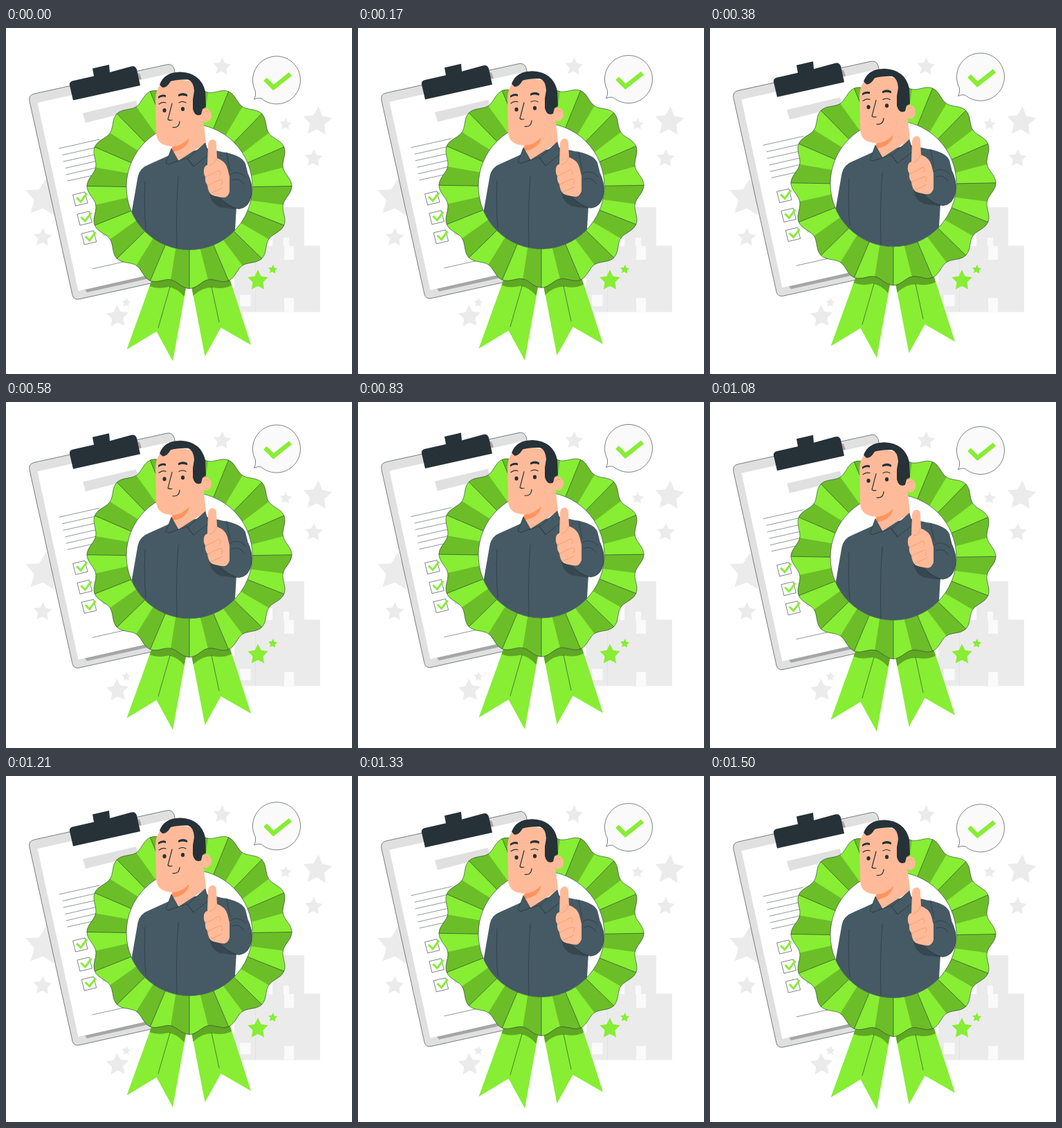
Animation of 500 by 500 pixels, one loop 1.54 s. Source, as an HTML page:

```html
<!DOCTYPE html>
<html lang="en">
<head>
<meta charset="utf-8">
<title>Approved</title>
<style>
html, body { margin: 0; width: 100%; height: 100%; overflow: hidden; background: #fff; }
svg { display: block; width: 100vw; height: 100vh; }
.line { fill: none; stroke: #263238; stroke-width: .6; stroke-linecap: round; stroke-linejoin: round; }
.outlined { stroke: #263238; stroke-width: .6; stroke-linejoin: round; }
.green { fill: #87ee33; }
.deep { fill: #6bbe28; }
.shade { fill: #5fa724; }
.skin { fill: #ffbb99; }
.ink { fill: #263238; }
.shirt { fill: #455a64; }
.tick { fill: none; stroke: #87ee33; }
</style>
</head>
<body>
<svg viewBox="0 0 500 500">
  <defs>
    <clipPath id="frame"><path d="M174 229.500A91 91 0 0 0 356 229.500V60H174Z"/></clipPath>
    <g id="item">
      <path class="line" d="M97 241l17-4l4 16l-17 4Z"/>
      <path class="tick" stroke-width="3" d="M102 245l6 6l9-12"/>
    </g>
  </defs>

  <g fill="#ebebeb">
    <path d="M330 315H385V259H431V314.500H454V410.500H330Z"/>
    <path fill="#fafafa" d="M402 315h14v20h-14zM401 303h8v12h-8zM402 390h14v20.500h-14zM338 385.500h15.500v16.500h-15.500z"/>
    <path fill="none" stroke="#e0e0e0" stroke-width=".8" d="M360.500 315V410"/>
  </g>
  <g id="stars"></g>

  <g id="floating">
    <g id="clipboard">
      <path class="outlined" fill="#e0e0e0" d="M41 95L232 53Q240 51 243 59L306 341Q307 347 300 349L105 392Q98 393 96 386L34 106Q32 97 41 95Z"/>
      <path fill="#a6a6a6" d="M114 378L220 354V359L117 382Z"/>
      <path fill="#fff" d="M45.500 108L235 66L294 337L104.500 380Z"/>
      <path fill="#a6a6a6" d="M188 64l5 2l3 8l-6 1z"/>
      <path class="ink" d="M97 104.500L92 83Q91 78 96 76.500L127 69.500L125 58.500L149 53L150 64L181 55.500Q187 54 189 60L194 83Z"/>
      <path fill="#e0e0e0" d="M111 123L188 105L191 118L115 137Z"/>
      <path class="line" stroke-opacity=".85" d="M77 174L135 161M82 183.500L135 171.500M83 193L135 181.500M86 202.500L130 192.500M87 212L130 202M89 221L130 212M125 348L210 329"/>
      <path fill="#e0e0e0" d="M138 294l10-2v8l-8 1z"/>
      <use href="#item"/><use href="#item" x="6.300" y="28"/><use href="#item" x="12.600" y="56"/>
    </g>

    <g id="bubble">
      <path class="outlined" fill="#fafafa" d="M360.500 91.500A34.500 34.500 0 1 1 368.500 101.500Q363 100.500 358.500 103Q361.500 98 360.500 91.500Z"/>
      <path class="tick" stroke-width="6.500" d="M374.500 74L386.500 86L411 66.500"/>
    </g>

    <g id="ribbons">
      <path class="green" d="M214 355L174.500 464.500L217.500 438.500L241 481.500L263 360Z"/>
      <path class="green" d="M265.500 360L287.500 474.500L310.500 433L354 458L320 352Z"/>
      <path class="shade" d="M214 355L207.500 373Q220 378 235 374Q247 376 257.500 388L263 360Z"/>
      <path class="shade" d="M265.500 360L270.500 387Q284 374 299 375Q314 378 326 372L320 352Z"/>
      <path class="line" d="M237 374L220 433M297 374L308 425"/>
    </g>

    <g id="rosette"></g>
    <circle class="outlined" cx="265" cy="229.500" r="91" fill="#fff"/>

    <g id="man">
      <g clip-path="url(#frame)">
        <path class="shirt" d="M238 183L207 197Q193 202 190.500 215L180 275V325H331V292L333 258L325 182L290 174Z"/>
        <path class="line" d="M201 222Q199 258 202 290M250 203Q245 255 247 318"/>
        <path fill="#37474f" d="M294 239Q296 253 309 259L333 262V242Z"/>
        <path class="shirt" d="M315 179.500Q341 184 346 196L350 212Q356 225 355.500 237Q353 260 336 261.500Q321 258 308 244L322 234L320 195Z"/>
        <path class="line" d="M319 180Q321 195 324 206M324 212Q335 204 347 216M326 220Q337 215 344 226M350 212Q356 225 355 240Q352 260 336 261.500Q321 258 310 246"/>
      </g>
      <path class="skin" d="M242 160L239 176L249 192L289 166L285 130L262 125Z"/>
      <path fill="#ff935e" d="M241 170Q255 170 265 159Q261 177 239 179Z"/>
      <path class="shirt outlined" d="M239 174L231 195L235 197L249 192Z"/>
      <path class="shirt outlined" d="M288 166L293 183L271 200L262 189Z"/>
      <path class="shirt" d="M249 192L262 189L270 201L248 215L235 197Z"/>
      <path class="line" d="M235 197L249 192L262 188L271 200"/>

      <ellipse class="skin" cx="289" cy="126" rx="8" ry="10"/>
      <path class="skin" d="M222 83Q216 91 216 105L217 152Q218 171 242 171Q257 170 268 154L285 130L283 82Q245 67 222 83Z"/>
      <path class="ink" d="M222 82Q228 64 252 63.500Q282 65 288 92L289 114L284 117L282 125Q273 129 270 117V103L272 91Q271 77 263 74.500Q246 74 238 77Q232 87 226 86Z"/>
      <path fill="none" stroke="#ff935e" stroke-width=".8" d="M285 123Q290 118 293 122"/>
      <ellipse class="ink" cx="229" cy="119" rx="2.600" ry="3"/>
      <ellipse class="ink" cx="255.500" cy="117" rx="2.600" ry="3"/>
      <path class="ink" d="M220 99Q225 95 231 97V100Q225 98 220 102ZM249 96Q256 92 262 96V99Q255 96 249 99Z"/>
      <path class="line" style="stroke-width:1.200" d="M221 110Q226 106 231 108M250 108Q255 105 260 108M240 109L234 132Q236 134 240 133M241 143.500Q250 145 251 135"/>

      <path class="skin" d="M291 198L292 168Q293 161 299 161Q304 162 304 168L305 188Q317 192 320 203L323 215V237Q320 245 315 245Q304 244 297 241Q292 237 291 227Q287 222 288 215Q285 211 286 204Q287 199 291 198Z"/>
      <path fill="none" stroke="#ff935e" stroke-width=".8" stroke-linecap="round" d="M304 188Q303 196 294 199M289 215Q299 211 307 206Q312 207 309 213M291 228Q301 222 311 219Q315 222 311 227M297 238Q305 235 312 231"/>
    </g>
  </g>
  <g id="sparks"></g>
</svg>
<script>
const $ = id => document.getElementById(id);
const polar = (cx, cy, r, deg) => {
  const a = deg * Math.PI / 180;
  return (cx + r * Math.cos(a)).toFixed(1) + ' ' + (cy + r * Math.sin(a)).toFixed(1);
};
const range = (n, fn) => Array.from({ length: n }, (_, i) => fn(i));
const path = (points, attrs) => `<path d="M${points.join('L')}Z" ${attrs}/>`;

// Stars: centre, radius, tilt
const star = ([x, y, r, tilt], fill) =>
  path(range(10, i => polar(x, y, i % 2 ? r * .5 : r, i * 36 - 90 + tilt)), `fill="${fill}"`);

$('stars').innerHTML = [
  [55, 246, 29, 6], [53, 303, 14, 3], [161, 417, 17, -3], [174, 397, 7, 4],
  [312, 56, 13.5, 4], [404, 139, 9, 4], [450, 135.5, 22, 4], [444.5, 188.5, 13.5, 3]
].map(s => star(s, '#ebebeb')).join('');
$('sparks').innerHTML = [[364, 365, 15.5, 0], [385.5, 349, 7, 6]].map(s => star(s, '#87ee33')).join('');

// Rosette: scalloped rim with alternating light and dark pleats
const PLEATS = 16, STEP = 360 / PLEATS;
const rim = deg => polar(265, 228.5, 143 + 5 * Math.cos(PLEATS * deg * Math.PI / 180), deg);
const inner = deg => polar(265, 229.5, 90, deg);
const pleats = range(PLEATS, i => {
  const a = i * STEP;
  return path([inner(a), ...range(9, k => rim(a + k * STEP / 16)), inner(a + STEP * .56)], 'class="deep"') +
    `<path class="line" d="M${rim(a)}L${inner(a)}"/>`;
}).join('');
const edge = range(240, i => rim(i * 1.5));
$('rosette').innerHTML = path(edge, 'class="green"') + pleats + path(edge, 'class="line"');

const LOOP = 1540, LIFT = 8.7;
function draw(now) {
  const phase = (now + 20) % LOOP / LOOP;
  const y = -LIFT * (1 - Math.cos(2 * Math.PI * phase)) / 2;
  $('floating').setAttribute('transform', `translate(0 ${y.toFixed(2)})`);
}
const start = performance.now();
(function tick() {
  draw(performance.now() - start);
  requestAnimationFrame(tick);
})();
</script>
</body>
</html>
```
